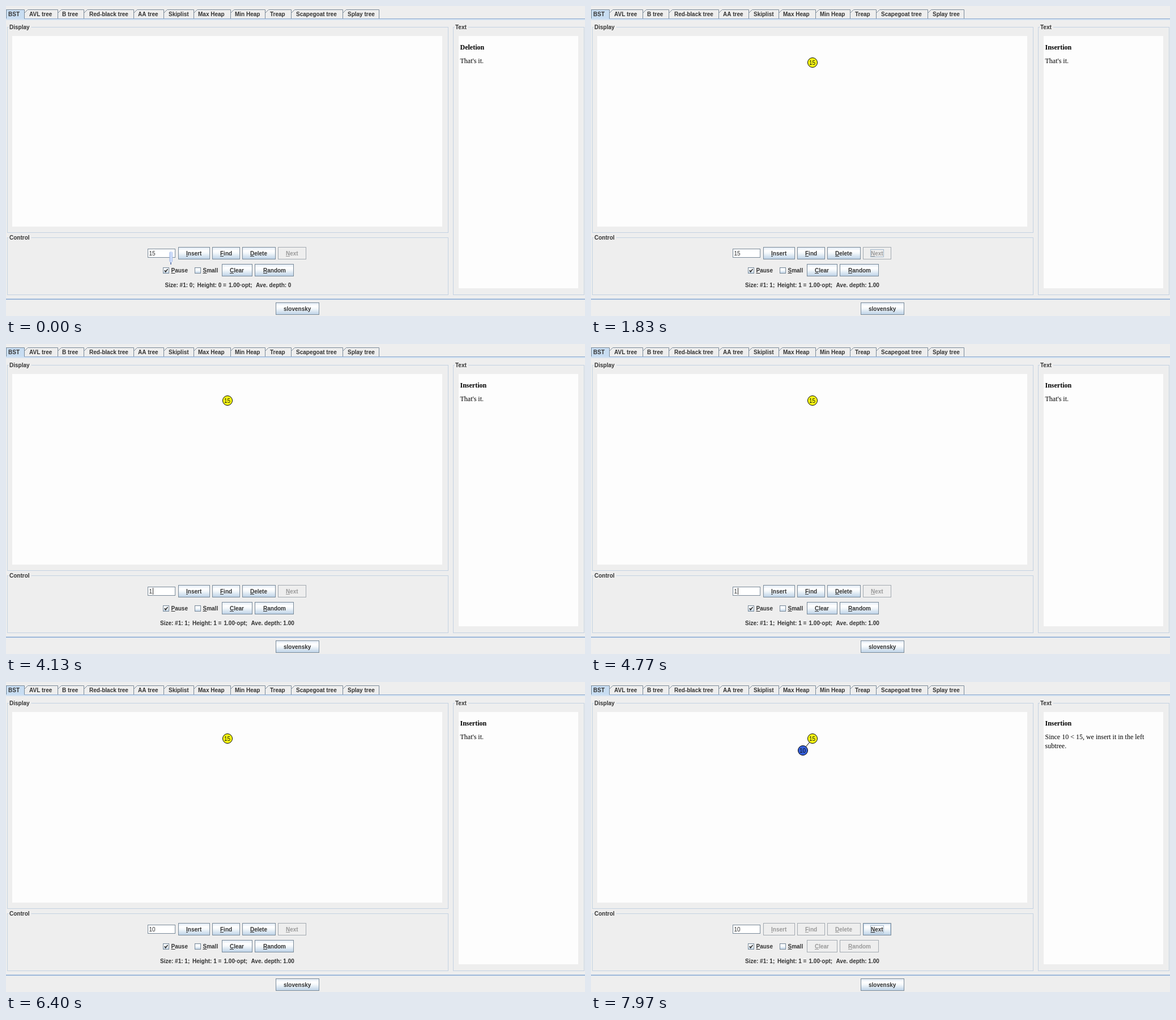
Recreate the animation shown at these times as an HTML page with a canvas. Size 1022 by 548 pixels, loop 8000 ms.

```html
<!DOCTYPE html>
<html lang="en">
<head>
<meta charset="utf-8">
<title>Binary search tree</title>
<style>
  html, body { margin: 0; width: 100%; height: 100%; overflow: hidden; background: #eee; }
  canvas { display: block; }
</style>
</head>
<body>
<canvas id="stage" width="1022" height="548"></canvas>
<script>
const ctx = document.getElementById('stage').getContext('2d');
const LOOP = 8000;
const SANS = '10px "Liberation Sans", Arial, sans-serif';
const BOLD = 'bold ' + SANS;
const SERIF = '12px "Liberation Serif", "Times New Roman", serif';
const PANEL = '#eee', PAPER = '#fdfdfd', EDGE = '#7a8a99', PALE = '#b8cfe5', INK = '#333', GREY = '#999';

// Moments at which the user acts
const INSERT_FIRST = 430, NEXT_FIRST = 1250, SELECT = 2900, TYPE_1 = 3770,
      TYPE_0 = 5400, INSERT_SECOND = 6800, NEXT_SECOND = 7550;

const ROOT = { x: 391, y: 100 }, ABOVE = { x: 391, y: 79 }, LEFT = { x: 374, y: 121 };
// Label, its left edge, right edge of the tab
const TABS = [['BST', 4, 33], ['AVL tree', 41, 92], ['B tree', 99, 138], ['Red-black tree', 147, 226],
  ['AA tree', 233, 279], ['Skiplist', 287, 332], ['Max Heap', 339, 397], ['Min Heap', 404, 458],
  ['Treap', 466, 504], ['Scapegoat tree', 512, 595], ['Splay tree', 603, 659]];

function rect(x, y, w, h, fill) {
  ctx.fillStyle = fill;
  ctx.fillRect(x, y, w, h);
}

function frame(x, y, w, h, color) {
  ctx.strokeStyle = color;
  ctx.lineWidth = 1;
  ctx.strokeRect(x + 0.5, y + 0.5, w - 1, h - 1);
}

function text(str, x, y, font = BOLD, color = INK, align = 'left') {
  ctx.font = font;
  ctx.fillStyle = color;
  ctx.textAlign = align;
  ctx.fillText(str, x, y);
}

function mnemonic(str, x, y, color = INK) {
  text(str, x, y, BOLD, color);
  rect(x, y + 1, Math.round(ctx.measureText(str[0]).width), 1, color);
}

function gloss(y, h) {
  const g = ctx.createLinearGradient(0, y, 0, y + h);
  g.addColorStop(0, '#dde8f3');
  g.addColorStop(0.3, '#fff');
  g.addColorStop(0.5, '#f4f8fb');
  g.addColorStop(1, PALE);
  return g;
}

function button(label, x, y, w, { enabled = true, focus = false, hover = false, plain = false } = {}) {
  const h = 22;
  rect(x, y, w, h, enabled ? gloss(y, h) : PANEL);
  frame(x, y, w, h, enabled ? EDGE : '#a3aab1');
  if (hover) frame(x + 1, y + 1, w - 2, h - 2, PALE);
  ctx.font = BOLD;
  const width = ctx.measureText(label).width;
  const left = Math.round(x + (w - width) / 2);
  const write = plain ? text : mnemonic;
  write(label, left, y + 15, ...(plain ? [] : [enabled ? INK : GREY]));
  if (focus) frame(left - 1, y + 4, Math.ceil(width) + 2, 14, '#a3b8cc');
}

function checkbox(label, x, checked) {
  rect(x, 462, 11, 11, gloss(462, 11));
  frame(x, 462, 11, 11, EDGE);
  if (checked) {
    ctx.beginPath();
    ctx.moveTo(x + 3, 467);
    ctx.lineTo(x + 4.5, 470);
    ctx.lineTo(x + 8.5, 465);
    ctx.strokeStyle = INK;
    ctx.lineWidth = 1.7;
    ctx.stroke();
  }
  mnemonic(label, x + 14.5, 471);
}

function group(title, x, y, w, h) {
  frame(x, y, w, h, '#c3d2e2');
  ctx.font = BOLD;
  rect(x + 3, y - 2, ctx.measureText(title).width + 4, 5, PANEL);
  text(title, x + 4, y + 4);
}

function tabs() {
  let left = 0;
  TABS.forEach(([label, x, right], i) => {
    ctx.beginPath();
    ctx.moveTo(left + 0.5, 22);
    ctx.lineTo(left + 0.5, i ? 12.5 : 6.5);
    ctx.lineTo(left + (i ? 6.5 : 0.5), 6.5);
    ctx.lineTo(right - 0.5, 6.5);
    ctx.lineTo(right - 0.5, 22);
    ctx.fillStyle = i ? PANEL : '#c8ddf2';
    ctx.fill();
    ctx.strokeStyle = EDGE;
    ctx.lineWidth = 1;
    ctx.stroke();
    text(label, x, 18);
    left = right - 1;
  });
  rect(0, 22, 1022, 1, '#8da9cf');
  rect(0, 23, 1022, 2, '#d5e3f1');
  rect(0, 22, 32, 1, '#c8ddf2');
}

function node(key, { x, y }, color) {
  ctx.beginPath();
  ctx.arc(x, y, 8.5, 0, 7);
  ctx.fillStyle = color;
  ctx.fill();
  ctx.strokeStyle = '#000';
  ctx.lineWidth = 1;
  ctx.stroke();
  text(key, x - 0.5, y + 3.7, SANS, '#111', 'center');
}

function glide(from, to, t, start, duration = 300) {
  const p = Math.min(1, Math.max(0, (t - start) / duration));
  return { x: from.x + (to.x - from.x) * p, y: from.y + (to.y - from.y) * p };
}

function tree(t) {
  ctx.save();
  ctx.beginPath();
  ctx.rect(11, 53, 759, 337);
  ctx.clip();
  const top = { x: 391, y: 40 };
  const fresh = t < NEXT_SECOND ? glide(top, ABOVE, t, INSERT_SECOND, 200)
                                : glide(ABOVE, LEFT, t, NEXT_SECOND);
  if (t >= NEXT_SECOND) {
    ctx.beginPath();
    ctx.moveTo(ROOT.x, ROOT.y);
    ctx.lineTo(fresh.x, fresh.y);
    ctx.strokeStyle = '#000';
    ctx.lineWidth = 1;
    ctx.stroke();
  }
  if (t >= INSERT_FIRST) node('15', glide(top, ROOT, t, INSERT_FIRST), t < NEXT_FIRST ? '#3560dd' : '#ffff14');
  if (t >= INSERT_SECOND) node('10', fresh, '#3560dd');
  ctx.restore();
}

function message(t) {
  if (t >= NEXT_SECOND) return ['Since 10 < 15, we insert it in the left', 'subtree.'];
  if (t >= INSERT_SECOND) return ['We start at the root.'];
  if (t >= INSERT_FIRST && t < NEXT_FIRST) return ['The tree is empty, so the new node', 'becomes the root.'];
  return ["That's it."];
}

function field(t) {
  rect(250, 429, 49, 16, '#fff');
  frame(250, 429, 49, 16, EDGE);
  const value = t < TYPE_1 ? '15' : t < TYPE_0 ? '1' : '10';
  const selected = t >= SELECT && t < TYPE_1;
  if (selected) rect(252, 431, 12, 12, PALE);
  text(value, 252.5, 441, SANS);
  const caret = selected || (t >= TYPE_1 && t < TYPE_0 + 200);
  if (caret) rect(Math.round(253 + ctx.measureText(value).width), 431, 1, 12, INK);
}

function status(t) {
  const filled = t >= NEXT_FIRST;
  const count = filled ? 1 : 0;
  const x = filled ? 272 : 280.5;
  text(`Size: #1: ${count};`, x, 497);
  text(`Height: ${count} =`, x + 57, 497);
  text('1.00·opt;', x + 112.5, 497);
  text(`Ave. depth: ${filled ? '1.00' : '0'}`, x + 160.5, 497);
}

function pointer() {
  const g = ctx.createLinearGradient(288, 0, 295, 0);
  g.addColorStop(0, '#8eaae0');
  g.addColorStop(0.5, '#dce8ff');
  g.addColorStop(1, '#8eaae0');
  ctx.beginPath();
  ctx.roundRect(288.5, 434, 5.5, 19, 2.5);
  ctx.fillStyle = g;
  ctx.fill();
  rect(290, 453, 2, 4, '#7088b8');
}

function draw(t) {
  const waiting = (t >= INSERT_FIRST && t < NEXT_FIRST) || t >= INSERT_SECOND;
  const idle = { enabled: !waiting };
  const nextClicked = (t >= NEXT_FIRST && t < SELECT) || t >= NEXT_SECOND;

  rect(0, 0, 1022, 548, PANEL);
  tabs();
  group('Display', 2, 37, 779, 364);
  group('Control', 2, 409, 779, 102);
  group('Text', 789, 37, 232, 474);
  rect(11, 53, 759, 337, PAPER);
  rect(799, 53, 211, 446, PAPER);
  rect(0, 517, 1022, 1, PALE);
  rect(0, 518, 1022, 1, '#8da9cf');
  rect(0, 519, 1022, 1, '#dce6f1');

  tree(t);
  text(t < INSERT_FIRST ? 'Deletion' : 'Insertion', 801.5, 77, 'bold ' + SERIF, '#000');
  message(t).forEach((line, i) => text(line, 801.5, 101 + 16 * i, SERIF, '#000'));

  field(t);
  button('Insert', 304, 426, 56, { ...idle, focus: waiting && !nextClicked });
  button('Find', 364, 426, 49, idle);
  button('Delete', 417, 426, 59, idle);
  button('Next', 480, 426, 50, { enabled: waiting, focus: nextClicked, hover: t >= NEXT_SECOND });
  checkbox('Pause', 277, true);
  checkbox('Small', 333, false);
  button('Clear', 381, 456, 54, idle);
  button('Random', 439, 456, 69, idle);
  status(t);
  button('slovensky', 476, 524, 77, { plain: true });
  if (t < INSERT_FIRST) pointer();
}

function tick(now) {
  draw(now % LOOP);
  requestAnimationFrame(tick);
}
requestAnimationFrame(tick);
</script>
</body>
</html>
```
